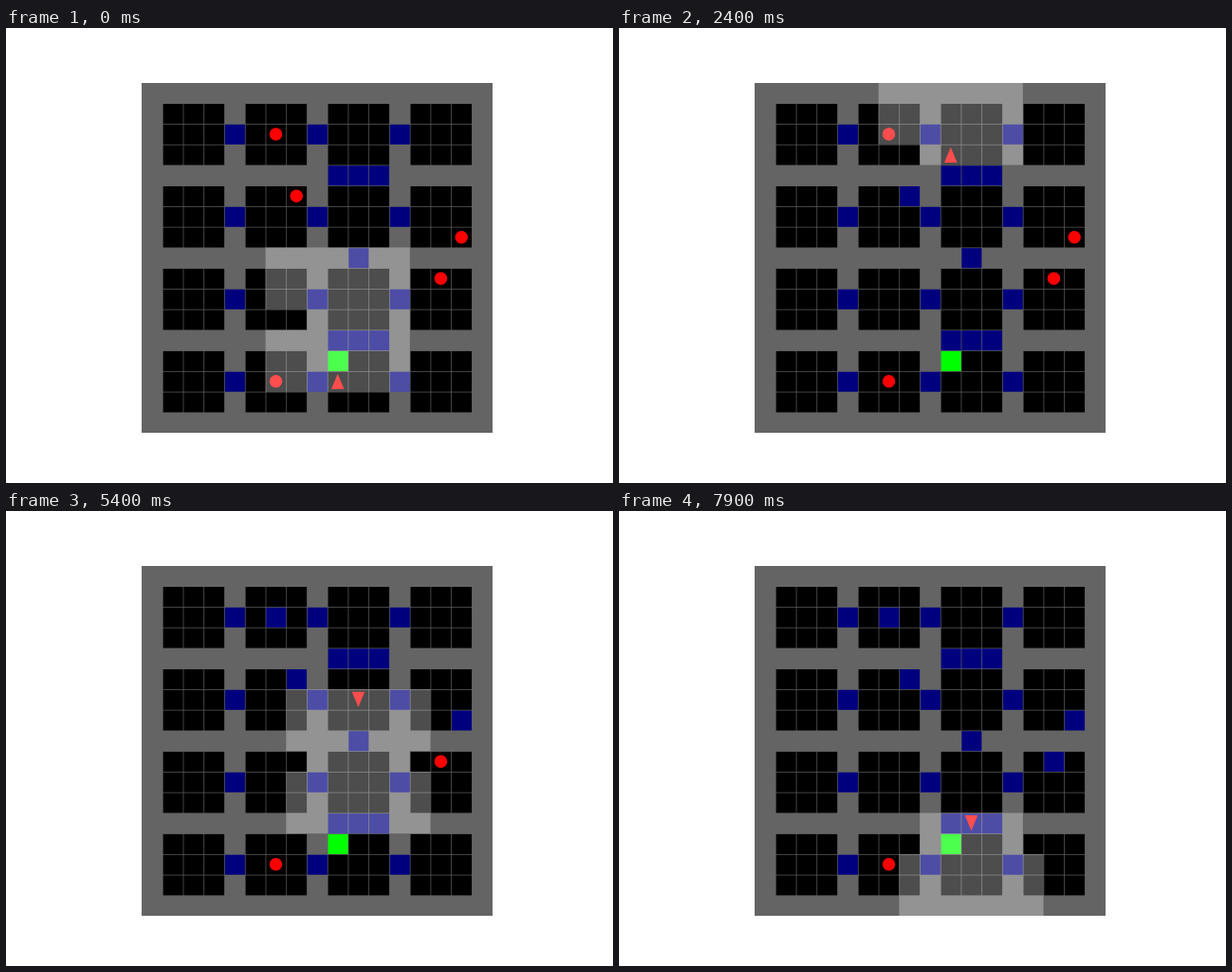
Animation, 640 px wide and 480 px high, one loop 8 s. Source, as an HTML page with a canvas:

```html
<!DOCTYPE html>
<html lang="en">
<head>
<meta charset="utf-8">
<title>Grid world</title>
<style>
  html, body { margin: 0; width: 100%; height: 100%; overflow: hidden; background: #fff; }
  canvas { display: block; }
</style>
</head>
<body>
<canvas id="stage" width="640" height="480"></canvas>
<script>
const ctx = document.getElementById('stage').getContext('2d');
const SIZE = 17, TILE = 369.6 / SIZE, LEFT = 143.2, TOP = 57.6;
const LINE = TILE / 32, VIEW = 7, STEP_MS = 100;
const DIRS = [[1, 0], [0, 1], [-1, 0], [0, -1]];
const GOAL = '9,13';

// F forward, L / R turn, P pick up the ball ahead
const MOVES = ('RFL FFFFFFFF L FFF RPR FF L FFFF L FF P LL FFF R FFFF L FFFFF ' +
  'RPR FFFFF L FFFF L FFFF LPL FFFFF LL F RR L FF').replace(/ /g, '');

const key = (x, y) => x + ',' + y;

const doors = new Set([key(10, 8)]);
for (const x of [4, 8, 12]) for (const y of [2, 6, 10, 14]) doors.add(key(x, y));
for (const x of [9, 10, 11]) for (const y of [4, 12]) doors.add(key(x, y));

const isWall = (x, y) =>
  x < 0 || y < 0 || x >= SIZE || y >= SIZE ||
  ((x % 4 === 0 || y % 4 === 0) && !doors.has(key(x, y)));

// Ball cell -> step at which it is picked up
const balls = new Map(['6,2', '7,5', '15,7', '14,9', '6,14'].map(k => [k, Infinity]));

function walk() {
  let x = 9, y = 14, dir = 3;
  const poses = [{ x, y, dir }];
  [...MOVES].forEach((move, i) => {
    const [dx, dy] = DIRS[dir];
    if (move === 'F') { x += dx; y += dy; }
    else if (move === 'R') dir = (dir + 1) % 4;
    else if (move === 'L') dir = (dir + 3) % 4;
    else balls.set(key(x + dx, y + dy), i + 1);
    poses.push({ x, y, dir });
  });
  return poses;
}
const poses = walk();

// Cells the agent sees: light spreads sideways and forward, walls stop it
function visibleCells({ x, y, dir }) {
  const [fx, fy] = DIRS[dir], [rx, ry] = DIRS[(dir + 1) % 4];
  const half = (VIEW - 1) / 2;
  const cell = (side, ahead) =>
    [x + fx * ahead + rx * (side - half), y + fy * ahead + ry * (side - half)];
  const seen = Array.from({ length: VIEW + 1 }, () => Array(VIEW).fill(false));
  seen[0][half] = true;
  const cells = [];
  for (let a = 0; a < VIEW; a++) {
    const spread = (s, d) => {
      if (!seen[a][s] || isWall(...cell(s, a))) return;
      seen[a][s + d] = seen[a + 1][s + d] = seen[a + 1][s] = true;
    };
    for (let s = 0; s < VIEW - 1; s++) spread(s, 1);
    for (let s = VIEW - 1; s > 0; s--) spread(s, -1);
    for (let s = 0; s < VIEW; s++) if (seen[a][s]) cells.push(cell(s, a));
  }
  return cells.filter(([cx, cy]) => cx >= 0 && cy >= 0 && cx < SIZE && cy < SIZE);
}

const px = x => LEFT + x * TILE;
const py = y => TOP + y * TILE;

function drawTile(x, y, step) {
  const k = key(x, y), ball = balls.has(k);
  const taken = ball && step >= balls.get(k);
  ctx.fillStyle = k === GOAL ? '#0f0' : doors.has(k) || taken ? '#00007f' : '#000';
  ctx.fillRect(px(x) + LINE, py(y) + LINE, TILE - LINE, TILE - LINE);
  if (ball && !taken) {
    ctx.fillStyle = '#f00';
    ctx.beginPath();
    ctx.arc(px(x + 0.5), py(y + 0.5), TILE * 0.31, 0, Math.PI * 2);
    ctx.fill();
  }
}

function drawAgent({ x, y, dir }) {
  ctx.save();
  ctx.translate(px(x + 0.5), py(y + 0.5));
  ctx.rotate(dir * Math.PI / 2);
  ctx.scale(TILE, TILE);
  ctx.fillStyle = '#f00';
  ctx.beginPath();
  ctx.moveTo(-0.38, -0.31);
  ctx.lineTo(0.37, 0);
  ctx.lineTo(-0.38, 0.31);
  ctx.fill();
  ctx.restore();
}

function draw(step) {
  ctx.fillStyle = '#fff';
  ctx.fillRect(0, 0, 640, 480);
  ctx.save();
  ctx.beginPath();
  ctx.rect(143, 58, 370, 369);
  ctx.clip();
  ctx.fillStyle = '#646464';
  ctx.fillRect(143, 58, 370, 369);
  for (let y = 0; y < SIZE; y++)
    for (let x = 0; x < SIZE; x++) if (!isWall(x, y)) drawTile(x, y, step);
  drawAgent(poses[step]);

  // One path, so neighbouring cells leave no seams
  ctx.fillStyle = 'rgba(255, 255, 255, 0.3)';
  ctx.beginPath();
  for (const [x, y] of visibleCells(poses[step])) ctx.rect(px(x), py(y), TILE, TILE);
  ctx.fill();
  ctx.restore();
}

let shown = -1;
function tick() {
  const step = Math.floor(performance.now() / STEP_MS) % poses.length;
  if (step !== shown) draw(shown = step);
  requestAnimationFrame(tick);
}
tick();
</script>
</body>
</html>
```
